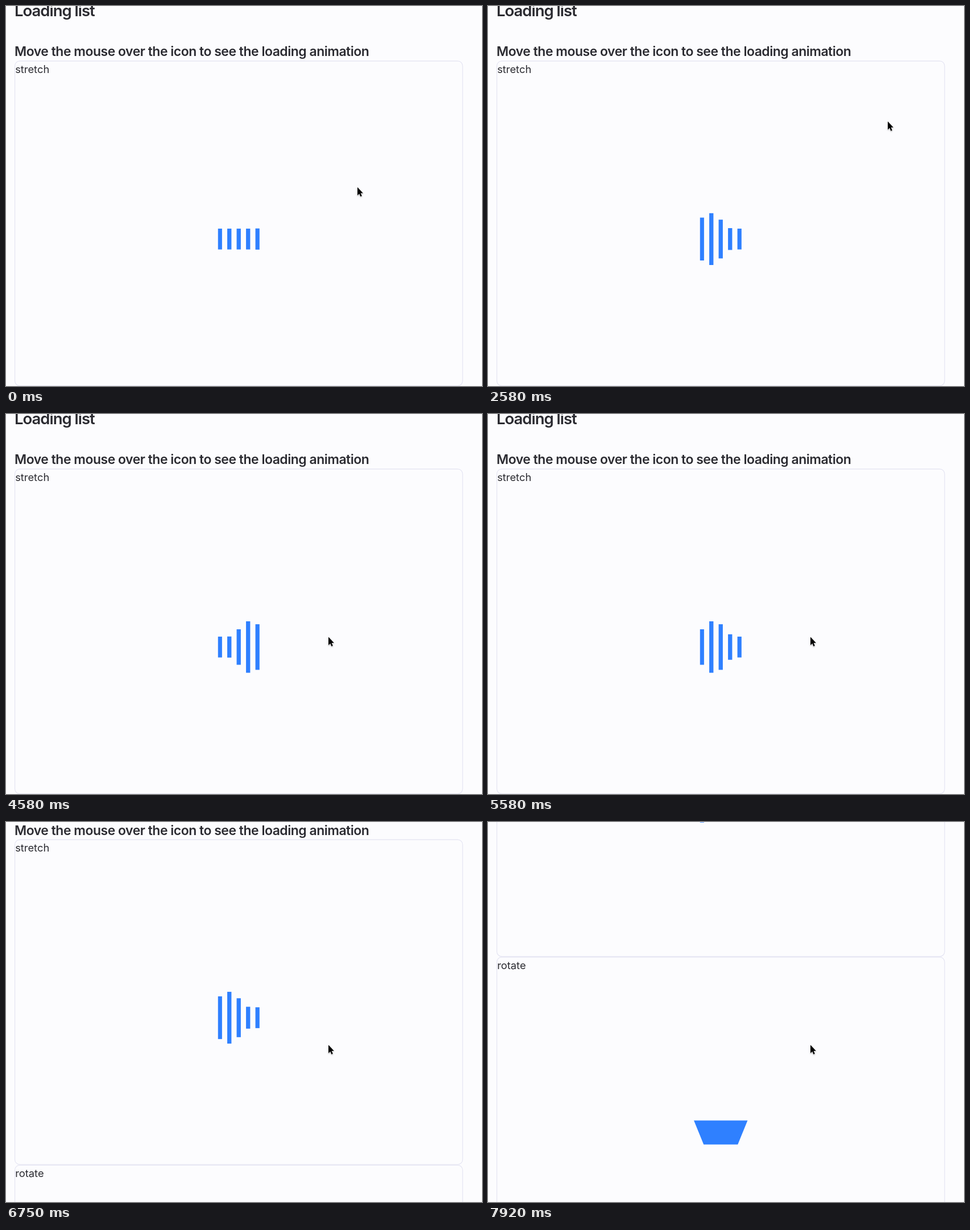
Animation, 837 px wide and 669 px high, one loop 8 s. Source, as an HTML page:

```html
<!DOCTYPE html>
<html lang="en">
<head>
<meta charset="utf-8">
<title>Loading list</title>
<style>
  html, body { margin: 0; width: 100%; height: 100%; overflow: hidden; background: #fcfcfe; }
  #stage { position: relative; width: 837px; height: 669px; overflow: hidden; }
  #zoom { position: absolute; transform: translateX(15px) scale(1.146); transform-origin: 0 0; }
  #page {
    position: absolute; width: 688px;
    font: 16px/24px Inter, sans-serif; color: #2b2b31;
    -webkit-font-smoothing: antialiased;
  }
  h2, h3 { position: absolute; margin: 0; font-weight: 600; white-space: nowrap; }
  h2 { top: -8px; font-size: 24px; line-height: 32px; letter-spacing: -.037em; }
  h3 { top: 56px; font-size: 20px; line-height: 28px; letter-spacing: -.0205em; }
  .card {
    position: absolute; width: 688px; height: 500px; box-sizing: border-box;
    border: 1px solid #e4e4f2; border-radius: 8px;
  }
  .icon { position: absolute; left: 311px; width: 64px; }
  #bars { top: 233px; height: 80px; fill: #2f80ff; }
  #plane { top: 241px; height: 64px; background: #2f80ff; }
  #cursor { position: absolute; left: 0; top: 0; overflow: visible; filter: drop-shadow(0 1px 1px #0004); }
</style>
</head>
<body>
<div id="stage">
  <div id="zoom">
    <div id="page">
      <h2>Loading list</h2>
      <h3>Move the mouse over the icon to see the loading animation</h3>
      <div class="card" style="top:84px">stretch<svg class="icon" id="bars"></svg></div>
      <div class="card" style="top:584px">rotate<div class="icon" id="plane"></div></div>
    </div>
  </div>
  <svg id="cursor" width="14" height="22">
    <path d="M0 0V14.4L3.2 11.4L5.4 16.6L7.8 15.6L5.6 10.4H9.8Z" stroke="#fff" paint-order="stroke"/>
  </svg>
</div>
<script>
const LOOP = 8000, FRAMES_PER_MS = 0.012;
const CYCLE = 1200, START_PHASE = 862, ROTATE_START = 7683;
const BAR_HEIGHT = 80;

const el = id => document.getElementById(id);
const bars = Array.from({ length: 5 }, (_, i) => {
  const bar = document.createElementNS('http://www.w3.org/2000/svg', 'rect');
  bar.setAttribute('x', i * 14.4);
  bar.setAttribute('width', 6.4);
  return el('bars').appendChild(bar);
});

const progress = (t, from, to) => Math.min(1, Math.max(0, (t - from) / (to - from)));

// cubic-bezier(.42, 0, .58, 1)
function easeInOut(x) {
  let low = 0, high = 1;
  for (let i = 0; i < 20; i++) {
    const u = (low + high) / 2, v = 1 - u;
    if (1.26 * u * v * v + 1.74 * u * u * v + u ** 3 < x) low = u; else high = u;
  }
  return low * low * (3 - 2 * low);
}

// The bars only run while the pointer is over their card.
function runningTime(t) {
  const spent = (from, to) => progress(t, from, to) * (to - from);
  return t - spent(1689, 2404) - spent(3790, 4356) - spent(ROTATE_START, LOOP);
}

function pointerAt(t) {
  let x = 618, y = 319;
  const glide = (from, to, endX, endY) => {
    const p = progress(t, from, to);
    x += (endX - x) * p;
    y += (endY - y) * p;
  };
  glide(420, 1100, 493, 372.5);
  glide(1400, 1800, 718, -30);
  glide(2250, 2650, 700, 250);
  glide(2650, 3583, 761, 148.5);
  glide(3583, 3920, 728, 67);
  glide(4300, 4560, 567, 392.5);
  return [x, y];
}

function drawBars(t) {
  const phase = (START_PHASE + runningTime(t)) % CYCLE;
  bars.forEach((bar, i) => {
    const distanceFromPeak = Math.abs(phase - 100 * i - 240) / 240;
    const height = BAR_HEIGHT * (0.4 + 0.6 * easeInOut(Math.max(0, 1 - distanceFromPeak)));
    bar.setAttribute('y', (BAR_HEIGHT - height) / 2);
    bar.setAttribute('height', height);
  });
}

function draw(t) {
  drawBars(t);
  const turn = 180 * easeInOut(progress(t, ROTATE_START, ROTATE_START + 600));
  el('plane').style.transform = `perspective(120px) rotateX(${-turn}deg)`;

  const scroll = 377 * progress(t, 6305, 7917) ** 1.463;
  el('page').style.transform = `translateY(${-scroll}px)`;

  const [x, y] = pointerAt(t);
  el('cursor').style.transform = `translate(${x}px, ${y}px)`;
}

const start = performance.now();
function tick() {
  const t = (performance.now() - start) % LOOP;
  draw(Math.floor((t + 4) * FRAMES_PER_MS) / FRAMES_PER_MS % LOOP);
  requestAnimationFrame(tick);
}
tick();
</script>
</body>
</html>
```
